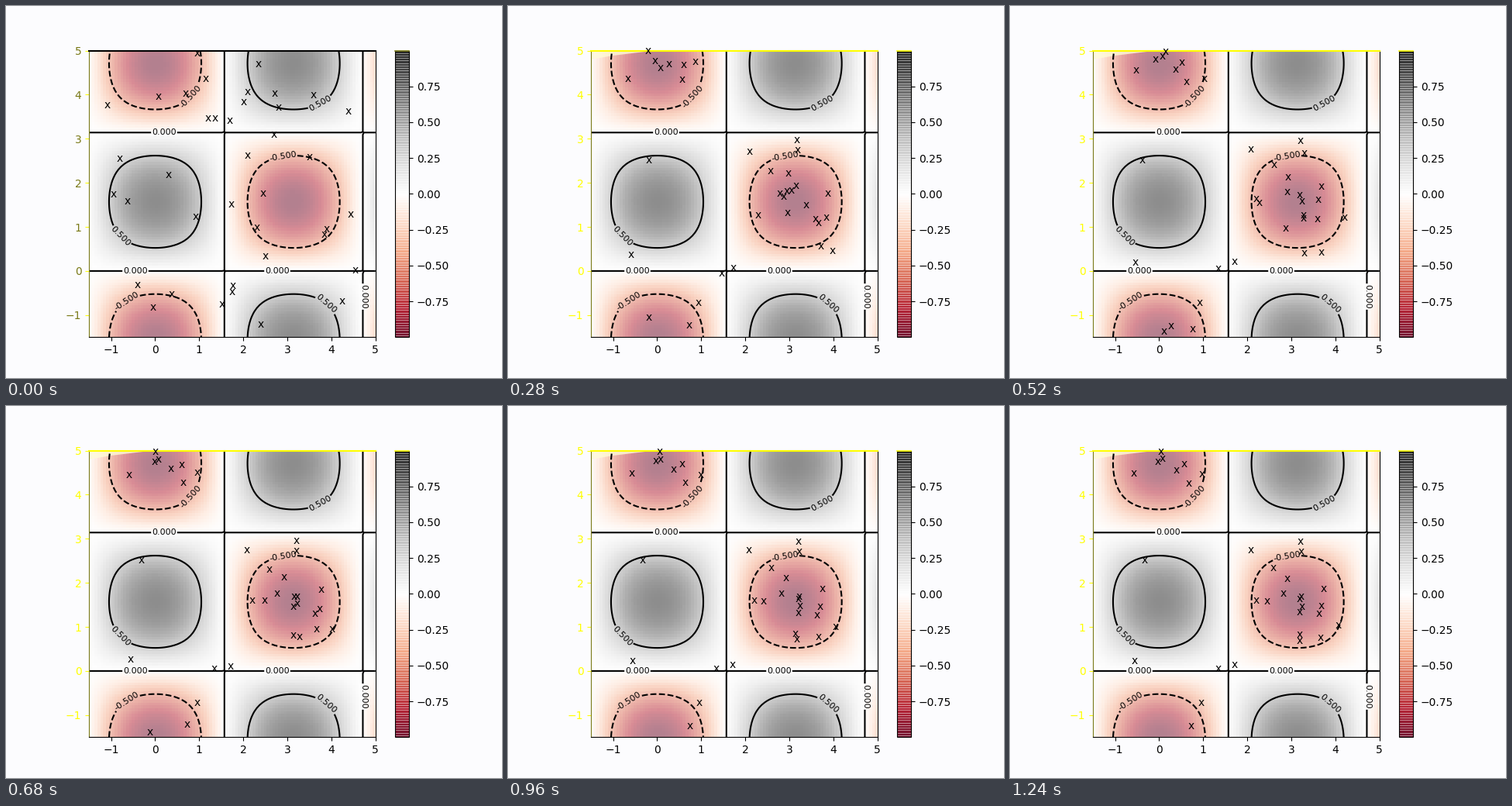
These frames come from a looping animation (640 px wide and 480 px high, 1280 ms). A matplotlib script:

```python
import numpy as np
import matplotlib.pyplot as plt
from matplotlib.animation import FuncAnimation

FRAMES, INTERVAL = 32, 40
LO, HI = -1.5, 5
LEFT, BOTTOM, SIDE = 107.2, 427.2, 369.6  # plot box on the stage, in pixels
SCALE = SIDE / (HI - LO)
YELLOW, OLIVE = "#ffff00", "#7a7a18"
rng = np.random.default_rng(7)


def to_data(px, py):
    """Stage pixels (y down) to data coordinates."""
    return LO + (px - LEFT) / SCALE, LO + (BOTTOM - py) / SCALE


# Resting places of the swarm around the minima, in stage pixels
rest = [(195, 59), (197, 68), (191, 72), (225, 75), (214, 83), (160, 87),
        (248, 88), (230, 100), (174, 199), (161, 329), (269, 339), (290, 334),
        (247, 383), (234, 413), (311, 186), (375, 175), (376, 188), (340, 209),
        (358, 223), (352, 242), (405, 236), (375, 246), (374, 249), (318, 251),
        (331, 252), (402, 258), (377, 260), (374, 266), (399, 268), (424, 283),
        (373, 295), (401, 298), (374, 304)]
# A few members settle in the minimum just below the visible area.
sunk = rng.normal((192, 433), (18, 2), (6, 2))
homes = np.vstack([rest, sunk])
count = len(homes)


def nearest_starts():
    """Scatter the swarm evenly and give every home its nearest free start."""
    free = list(rng.uniform((LEFT + 20, 60), (LEFT + SIDE - 25, 415), (count, 2)))
    starts = []
    for home in homes:
        gaps = [np.hypot(*(p - home)) for p in free]
        starts.append(free.pop(int(np.argmin(gaps))))
    return np.array(starts)


offsets = nearest_starts() - homes
speeds = rng.uniform(0.5, 0.85, (count, 1))


def swarm_at(i):
    """Every member swings around its home and rings down."""
    return homes + offsets * np.exp(-0.17 * i) * np.cos(speeds * i)


fig, ax = plt.subplots(figsize=(6.4, 4.8), dpi=100, facecolor="#fcfcfe")

# Field and colour bar; overlapping cell edges give the bar its stripes
axis = np.linspace(LO, HI, 100)
X, Y = np.meshgrid(axis, axis)
Z = np.cos(X) * np.sin(Y)
image = ax.imshow(Z, extent=(LO, HI, LO, HI), origin="lower",
                  cmap="RdGy", alpha=0.5)
bar = fig.colorbar(image, ax=ax)
bar.solids.set(edgecolor="face", linewidth=0.4)
ax.set_xticks(range(-1, 6))
ax.set_yticks(range(-1, 6))
fig.draw_without_rendering()  # settles the layout before labels are placed

# Contours with inline labels
lines = ax.contour(X, Y, Z, [-0.5, 0, 0.5], colors="black")
spots = [(238, 117), (357, 193), (155, 380), (405, 125), (149, 296),
         (414, 384), (204, 163), (167, 342), (350, 342), (460.4, 375)]
ax.clabel(lines, inline=True, inline_spacing=1, fontsize=8, fmt="%1.3f",
          manual=[to_data(*p) for p in spots])
upright = lines.labelTexts[-1]
upright.set(rotation=-90, va="center", position=to_data(461.5, 375))

# Yellow edges
ax.spines["top"].set_linewidth(1.5)
ax.spines["left"].set_color(OLIVE)
ax.tick_params(axis="y", color=YELLOW)
cap = bar.ax.axhline(image.get_clim()[1], lw=1.2, clip_on=False, zorder=5)
corner = [to_data(*p) for p in [(107.2, 58), (185, 58), (135, 64), (107.2, 69)]]
glow, = ax.fill(*zip(*corner), color="#fffbd8", alpha=0.8, lw=0, zorder=0.5)

crosses = [ax.annotate("x", xy=(0, 0), annotation_clip=True, zorder=6)
           for _ in homes]


def draw(i):
    first = i == 0
    edge = OLIVE if first else YELLOW
    ax.spines["top"].set_color("black" if first else YELLOW)
    cap.set_color(edge)
    glow.set_visible(not first)
    ax.tick_params(axis="y", labelcolor=edge)
    for cross, (px, py) in zip(crosses, swarm_at(i)):
        cross.xy = to_data(px - 4.1, py + 3.8)  # left end of the baseline
        cross.set_position(cross.xy)
    return crosses


anim = FuncAnimation(fig, draw, frames=FRAMES, interval=INTERVAL,
                     repeat=True, repeat_delay=0, blit=False)
plt.show()
```
